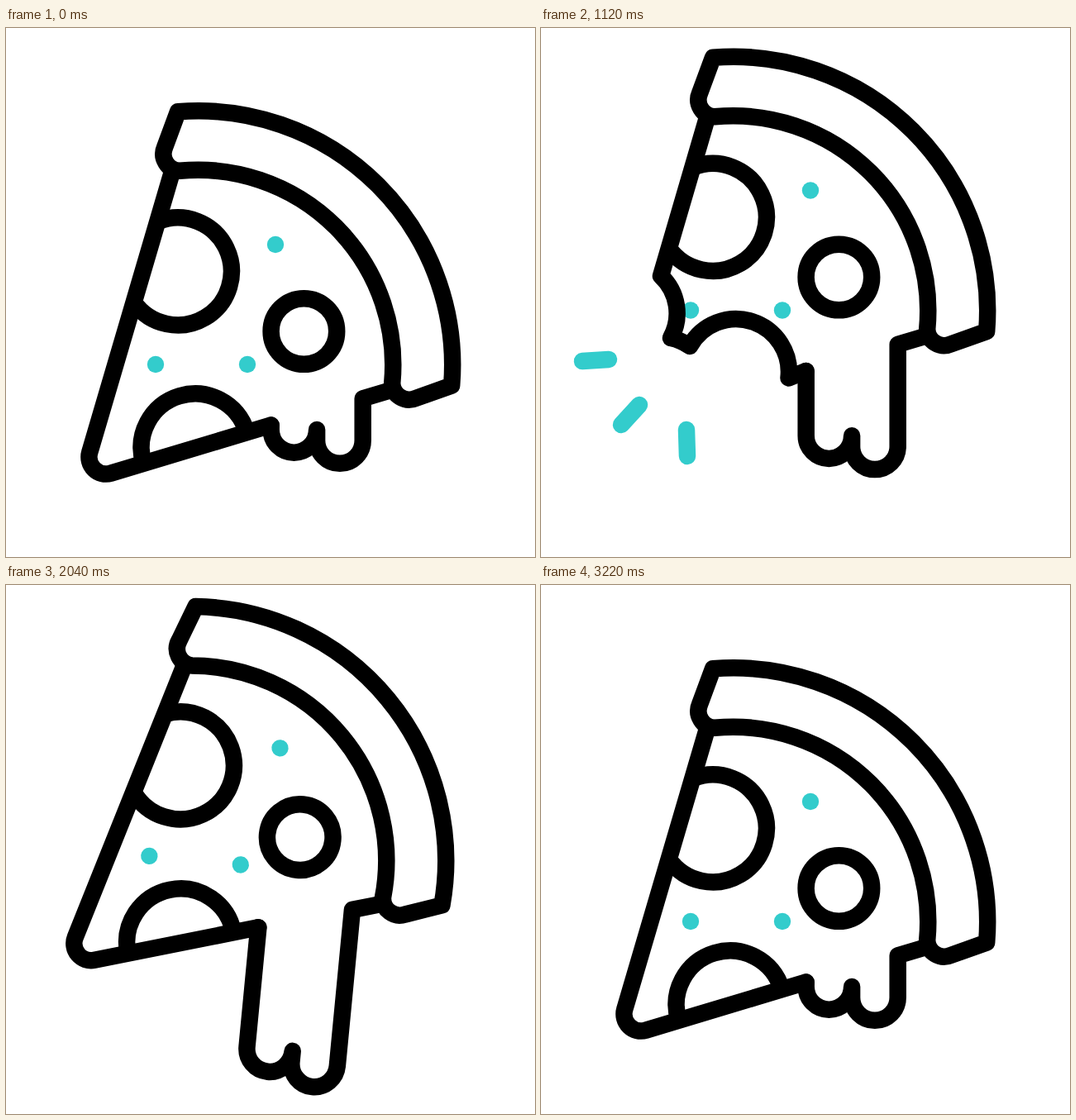
An HTML page for the animation above (3600 ms loop, 640x640 px).

```html
<!DOCTYPE html>
<html lang="en">
<head>
<meta charset="utf-8">
<title>Pizza slice</title>
<style>
  html, body { margin: 0; width: 100%; height: 100%; overflow: hidden; background: #fff; }
  svg { display: block; width: 100%; height: 100%; }
  .ink { fill: none; stroke: #000; stroke-width: 20.5; stroke-linejoin: round; }
  .cap { stroke-linecap: round; }
  .dots { fill: #33cccc; }
  #crumbs { fill: none; stroke: #33cccc; stroke-width: 20.5; stroke-linecap: round; }
</style>
</head>
<body>
<svg viewBox="0 0 640 640">
  <g id="slice">
    <g class="dots">
      <circle cx="326" cy="262" r="10.2"/>
      <circle cx="181" cy="407" r="10.2"/>
      <circle cx="292" cy="407" r="10.2"/>
    </g>
    <g class="ink">
      <path d="M208 101.3A307.5 307.5 0 0 1 539.2 432.5L496 447.8A20.5 20.5 0 0 1 467.2 430A236 236 0 0 0 210 172.8A20.5 20.5 0 0 1 192.2 144Z"/>
      <path d="M184.5 233.8A65 65 0 1 1 154.8 332"/>
      <circle cx="360.4" cy="367" r="39.8"/>
      <path id="topping" d="M166.5 526.5A65 65 0 0 1 291 488.5"/>
      <path id="edge" class="cap"/>
      <path id="drip" class="cap"/>
    </g>
  </g>
  <g id="crumbs"></g>
</svg>
<script>
const LOOP = 3600;
const LIFT = -65.5;
const SWING = 7;
const STRETCH = 141.5;

const WHOLE = "M201 174L101.3 513.2A20.5 20.5 0 0 0 127 538.6L320.5 480.5";
const BITTEN = "M201 174L145 365.5A62 62 0 0 1 157 440.5A60 60 0 0 1 180 450.5" +
  "A64 64 0 0 1 299.5 489L320.5 480.5";

// Inner end, then outer end of each crumb line
const CRUMBS = [
  [82, 401, 50, 403],
  [119, 456, 97, 480],
  [176, 486, 177, 518]
];

const $ = id => document.getElementById(id);
const clamp = v => Math.min(1, Math.max(0, v));
const span = (t, from, to) => clamp((t - from) / (to - from));
const mix = (a, b, k) => a + (b - a) * k;

function ease(t, from, to) {
  const k = span(t, from, to);
  return k * k * (3 - 2 * k);
}

function bezier(a, b, c, d, k) {
  const n = 1 - k;
  return [0, 1].map(i =>
    n * n * n * a[i] + 3 * n * n * k * b[i] + 3 * n * k * k * c[i] + k * k * k * d[i]);
}

function offset(t) {
  const rest = [0, 0], up = [0, LIFT], away = [44, -50];
  if (t < 600) return bezier(rest, [0, LIFT / 3], [-6, LIFT * 2 / 3], up, ease(t, 0, 600));
  if (t < 800) return bezier(up, [7, LIFT - 8], away, away, ease(t, 600, 800));
  if (t < 1000) return bezier(away, away, [7, LIFT + 3], up, ease(t, 800, 1000));
  return [0, LIFT * (1 - ease(t, 2600, 3200))];
}

function tilt(t) {
  if (t <= 1400 || t >= 2800) return 0;
  const step = Math.floor((t - 1400) / 200);
  const key = i => i === 0 || i === 7 ? 0 : i % 2 ? SWING : -SWING;
  const start = 1400 + step * 200;
  return mix(key(step), key(step + 1), ease(t, start, start + 200));
}

function dripPath(t) {
  const s = STRETCH * (ease(t, 0, 2200) - ease(t, 2200, 3200));
  return `M320.7 480.5V${486 + s}A27.7 27.7 0 0 0 376.1 ${486 + s}` +
    `V${499 + s}A27.8 27.8 0 0 0 431.7 ${499 + s}V448.3L467 437.8`;
}

const crumbLines = CRUMBS.map(() =>
  $("crumbs").appendChild(document.createElementNS("http://www.w3.org/2000/svg", "path")));

function drawCrumbs(t) {
  $("crumbs").style.display = t >= 1000 && t < 1300 ? "" : "none";
  const head = ease(t, 1000, 1080);
  const tail = ease(t, 1120, 1300);
  CRUMBS.forEach(([x1, y1, x2, y2], i) => {
    const at = k => `${mix(x1, x2, k)} ${mix(y1, y2, k)}`;
    crumbLines[i].setAttribute("d", `M${at(tail)}L${at(head)}`);
  });
}

function draw(t) {
  const [x, y] = offset(t);
  const bitten = t >= 1000 && t < 1800;
  $("slice").setAttribute("transform", `translate(${x} ${y}) rotate(${tilt(t)} 320 320)`);
  $("edge").setAttribute("d", bitten ? BITTEN : WHOLE);
  $("topping").style.display = bitten ? "none" : "";
  $("drip").setAttribute("d", dripPath(t));
  drawCrumbs(t);
}

function tick() {
  draw(performance.now() % LOOP);
  requestAnimationFrame(tick);
}
tick();
</script>
</body>
</html>
```
